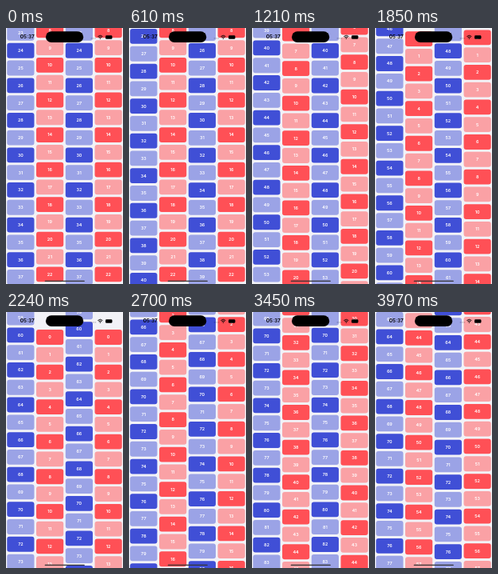
Animation of 147x320 px, one loop 4000 ms. Source, as an HTML page:

```html
<!DOCTYPE html>
<html lang="en">
<head>
<meta charset="utf-8">
<title>Linked scrolling columns</title>
<style>
  html, body { margin: 0; width: 100%; height: 100%; overflow: hidden; background: #f2f2f7; }
  svg { display: block; width: 100%; height: 100%; }
  text { font-family: Inter, Roboto, sans-serif; font-weight: 600; }
  #columns text { font-size: 5.4px; fill: #fff; text-anchor: middle; }
</style>
</head>
<body>
<svg viewBox="0 0 147 320">
  <g id="columns"></g>
  <text x="17.8" y="13.4" font-size="6.4">05:37</text>
  <rect x="50" y="4.2" width="47.2" height="13.9" rx="6.95"/>
  <path d="M107.2 12.9h6.4" stroke="#000" stroke-width="1.2" stroke-linecap="round" stroke-dasharray="0 1.8" opacity=".3"/>
  <path d="M115.4 10.6Q118.4 7.9 121.4 10.6M116.5 11.9Q118.4 10.3 120.3 11.9" fill="none" stroke="#000" stroke-width=".95"/>
  <path d="M117.3 12.8Q118.4 12 119.5 12.8L118.4 13.9Z"/>
  <rect x="125" y="9.2" width="8.4" height="4.5" rx="1.3"/>
  <path d="M133.8 10.6q.8.8 0 1.6z" opacity=".5"/>
  <rect x="48.6" y="315.7" width="50.3" height="1.3" rx=".65" fill="#333"/>
</svg>
<script>
const LOOP = 4000, PITCH = 21.78, COL = 36.75, MID = 160;
const FIRST = 520, STEP = 30.28;             // picture refresh, ms
const DRAG = 150, DECAY = 512, LAG = 16;     // touch physics, ms
const TOP_ROW = 5.9;                         // row at mid-screen when scrolled to the top

// Each flick: rows dragged under the finger, then rows coasted after release
const blue = { row: 30.05, flicks: [
  { at: 510, drag: 6.23, coast: 14.97 },
  { at: 1680, drag: 3.8, coast: 24 },
  { at: 3720, drag: -4.46, coast: -13.1 }
] };
const red = { row: 15.215, flicks: [
  { at: 1060, drag: -2.08, coast: -8.97 },
  { at: 2530, drag: 2.59, coast: 17.6 },
  { at: 3130, drag: 10.8, coast: 27.36 }
] };

// A new touch stops the previous coasting
function rowAt({ row, flicks }, t) {
  flicks.forEach(({ at, drag, coast }, i) => {
    const next = flicks[i + 1];
    const age = Math.min(t, next ? next.at : LOOP) - at;
    if (age <= 0) return;
    const pull = Math.min(age / DRAG, 1), free = Math.max(age - DRAG, 0);
    row += drag * pull * pull + coast * (1 - Math.exp(-free / DECAY));
    row = Math.max(row, TOP_ROW);
  });
  return row;
}

function add(parent, tag, attrs, label) {
  const el = document.createElementNS('http://www.w3.org/2000/svg', tag);
  for (const name in attrs) el.setAttribute(name, attrs[name]);
  if (label !== undefined) el.textContent = label;
  return parent.appendChild(el);
}

const columns = [0, 1, 2, 3].map(c => {
  const group = add(document.getElementById('columns'), 'g', {});
  const x = (c + 0.5) * COL;
  const fills = c % 2 ? ['#ff5056', '#faa1a5'] : ['#404fd6', '#9ba3e6'];
  for (let n = 0; n < 100; n++) {
    const y = n * PITCH;
    add(group, 'rect', { x: x - 17.1, y: y - 9.4, width: 34.2, height: 18.8, rx: 3, fill: fills[n % 2] });
    add(group, 'text', { x, y: y + 1.95 }, n);
  }
  return group;
});

// One column of each pair is touched; its partner trails slightly
function draw(time) {
  const t = FIRST + Math.floor((time - FIRST + 9) / STEP) * STEP;
  const blueLag = t > 1650 ? [LAG, 0] : [0, LAG];
  const rows = [
    rowAt(blue, t - blueLag[0]), rowAt(red, t),
    rowAt(blue, t - blueLag[1]), rowAt(red, t - LAG)
  ];
  columns.forEach((group, c) =>
    group.setAttribute('transform', `translate(0 ${MID - rows[c] * PITCH})`));
}

const start = performance.now();
function tick() {
  draw((performance.now() - start) % LOOP);
  requestAnimationFrame(tick);
}
tick();
</script>
</body>
</html>
```
